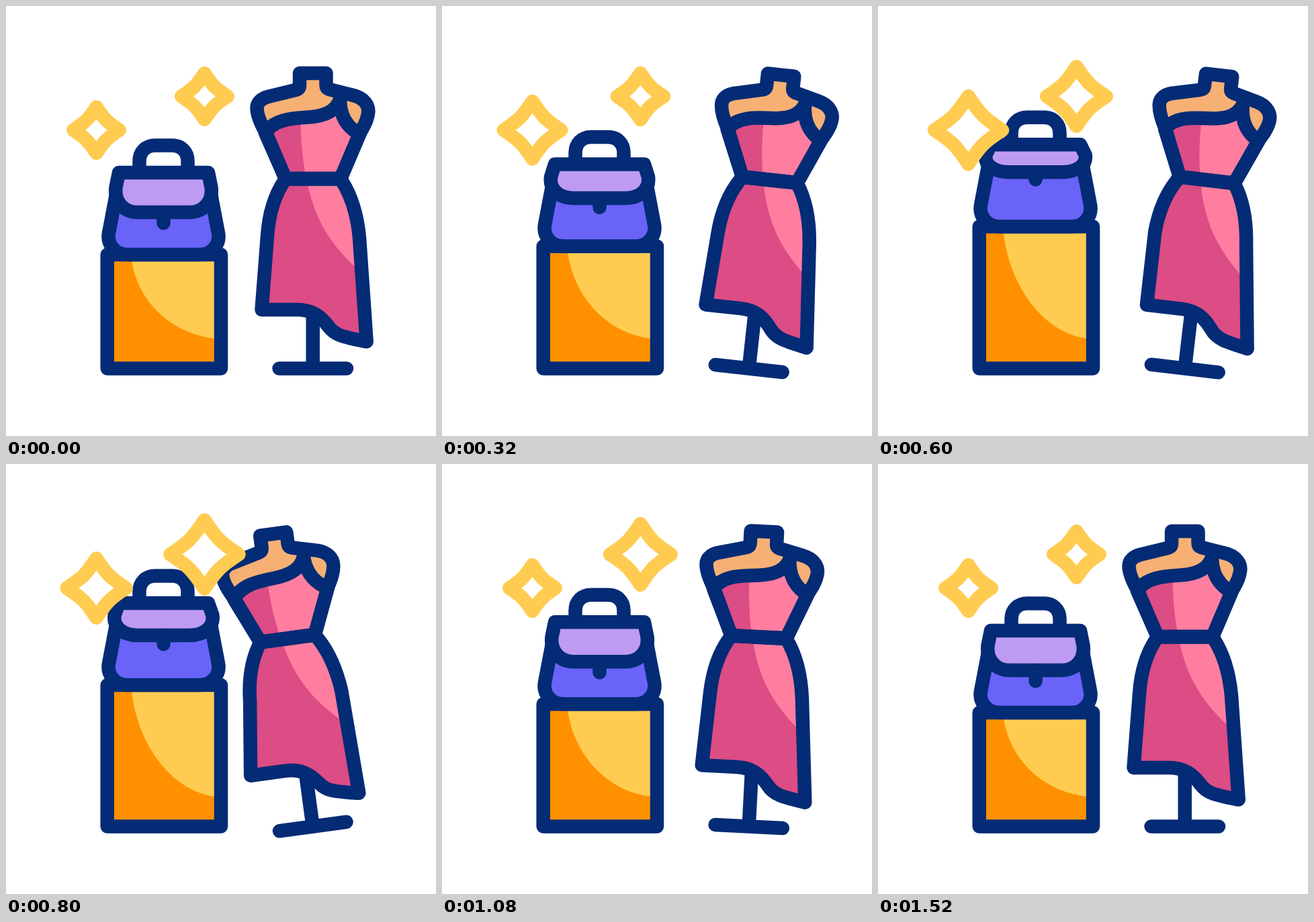
Recreate the animation shown at these times as an HTML page. Size 640x640 px, loop 1800 ms.

```html
<!DOCTYPE html>
<html lang="en">
<head>
<meta charset="utf-8">
<title>Boutique</title>
<style>
  html, body { margin: 0; width: 100%; height: 100%; overflow: hidden; background: #fff; }
  svg { display: block; width: 100vw; height: 100vh; }
  .line { fill: none; stroke: #042b75; }
  .star { fill: none; stroke: #ffcc51; }
  .line, .star { stroke-width: 20.5; stroke-linecap: round; stroke-linejoin: round; }
</style>
</head>
<body>
<svg viewBox="0 0 640 640">
  <defs>
    <path id="torso" d="M437 100H476.500V118C476.500 121 478 123 481 124L517 133C533 137 541 148 539 160C537 174 531 181 526.500 190L498 257H416L387 189C379 175 373.500 163 373.500 152C373.500 143 381 137.500 390 135L431 125C435 124 437 122 437 118Z"/>
    <path id="bodice" d="M386 189C398 169 425 167 450 165.500C474 164 491 157 497 139C497 158 504 175 519 186L526.500 190L498 257H416Z"/>
    <path id="skirt"/>
    <path id="body" d="M165 275L153 338C150 354 162 370 180 370H289C307 370 319 354 316 338L304 275Z"/>
    <path id="flap"/>
    <path id="box"/>
    <clipPath id="dress"><use href="#bodice"/><use href="#skirt"/></clipPath>
  </defs>

  <use href="#box" fill="#ff9100"/>
  <path id="shine" fill="#ffcc51"/>
  <use href="#box" class="line"/>

  <g id="bag">
    <path class="line" d="M198.500 246V231C198.500 217 208 207.500 222 207.500H247C261 207.500 270.500 217 270.500 231V246"/>
    <use href="#body" fill="#6963f8"/>
    <use href="#body" class="line"/>
    <use href="#flap" fill="#bd9bf3"/>
    <use href="#flap" class="line"/>
    <path id="clasp" class="line"/>
  </g>

  <g id="doll">
    <path class="line" d="M456.700 455V539.500M406.500 539.500H507"/>
    <use href="#torso" fill="#f6b074"/>
    <use href="#bodice" fill="#dc4c85"/>
    <use href="#skirt" fill="#dc4c85"/>
    <path clip-path="url(#dress)" fill="#ff7ea0" d="M439 130C437 195 441 225 447 257C460 320 482 355 530 398H570V130Z"/>
    <use href="#torso" class="line"/>
    <use href="#bodice" class="line"/>
    <use href="#skirt" class="line"/>
  </g>

  <path id="star1" class="star" transform="translate(134.5 184.700)"/>
  <path id="star2" class="star" transform="translate(295.400 134.500)"/>
</svg>
<script>
const LOOP = 1800, STEP = 40;

// [time in ms, value], sine eased between the stops
const tracks = {
  swing: [[68, 0], [505, 10.1], [838, -8.3], [1130, 3.8], [1520, 0]],
  hem:   [[200, 0], [580, 9], [915, -10.5], [1200, 9], [1520, 0]],
  lift:  [[115, 0], [690, 44.5], [1300, 0]],
  press: [[70, 0], [590, 18], [1080, 0]],
  grow1: [[40, 0], [585, 16.2], [1080, 0]],
  grow2: [[272, 0], [868, 17.3], [1386, 0]]
};

const el = id => document.getElementById(id);
const draw = (id, d) => el(id).setAttribute('d', d);
const move = (id, m) => el(id).setAttribute('transform', m);

function valueAt(stops, t) {
  if (t <= stops[0][0]) return stops[0][1];
  for (let i = 1; i < stops.length; i++) {
    const [t0, a] = stops[i - 1], [t1, b] = stops[i];
    if (t < t1) return a + (b - a) * (1 - Math.cos(Math.PI * (t - t0) / (t1 - t0))) / 2;
  }
  return stops[stops.length - 1][1];
}

function starPath(r) {
  const a = 0.36 * r, b = 0.453 * r;
  return `M0 ${-r}C${a} ${-b} ${b} ${-a} ${r} 0C${b} ${a} ${a} ${b} 0 ${r}` +
         `C${-a} ${b} ${-b} ${a} ${-r} 0C${-b} ${-a} ${-a} ${-b} 0 ${-r}Z`;
}

function skirtPath(d) {
  const x = v => v + d;
  return `M416 257.5C398 283 391 313 389 342L${x(380.5)} 452H${x(433)}` +
         `C${x(455)} 452 ${x(468)} 461 ${x(480)} 477C${x(490)} 491 ${x(504)} 493 ${x(536.7)} 499.5` +
         `L526 345C523 313 516 284 498 257.5Z`;
}

function flapPath(y, bulge) {
  const l = v => v - bulge, r = v => 469 - v + bulge;
  return `M168 248H301L${r(163.5)} ${y(22)}C${r(161)} ${y(42)} ${r(174)} ${y(59)} 273 ${y(59)}` +
         `H196C${l(174)} ${y(59)} ${l(161)} ${y(42)} ${l(163.5)} ${y(22)}Z`;
}

function render(t) {
  const v = {};
  for (const name in tracks) v[name] = valueAt(tracks[name], t);

  move('doll', `rotate(${v.swing} 456.7 539.5)`);
  draw('skirt', skirtPath(v.hem));

  const top = 370 - v.lift;
  draw('box', `M150.700 ${top}H320V539.500H150.700Z`);
  draw('shine', `M186 ${top}C192 ${top + 0.4 * (539.5 - top)} 245 489 315 495.500V${top}Z`);

  move('bag', `translate(0 ${-v.lift})`);
  const y = dy => 248 + dy * (1 - v.press / 59);
  draw('flap', flapPath(y, v.press * 0.17));
  draw('clasp', `M234.500 ${y(59)}V${y(75)}`);

  draw('star1', starPath(34.3 + v.grow1));
  draw('star2', starPath(34.3 + v.grow2));
}

const start = performance.now();
function tick() {
  const t = (performance.now() - start) % LOOP;
  render(Math.floor(t / STEP) * STEP);
  requestAnimationFrame(tick);
}
tick();
</script>
</body>
</html>
```
